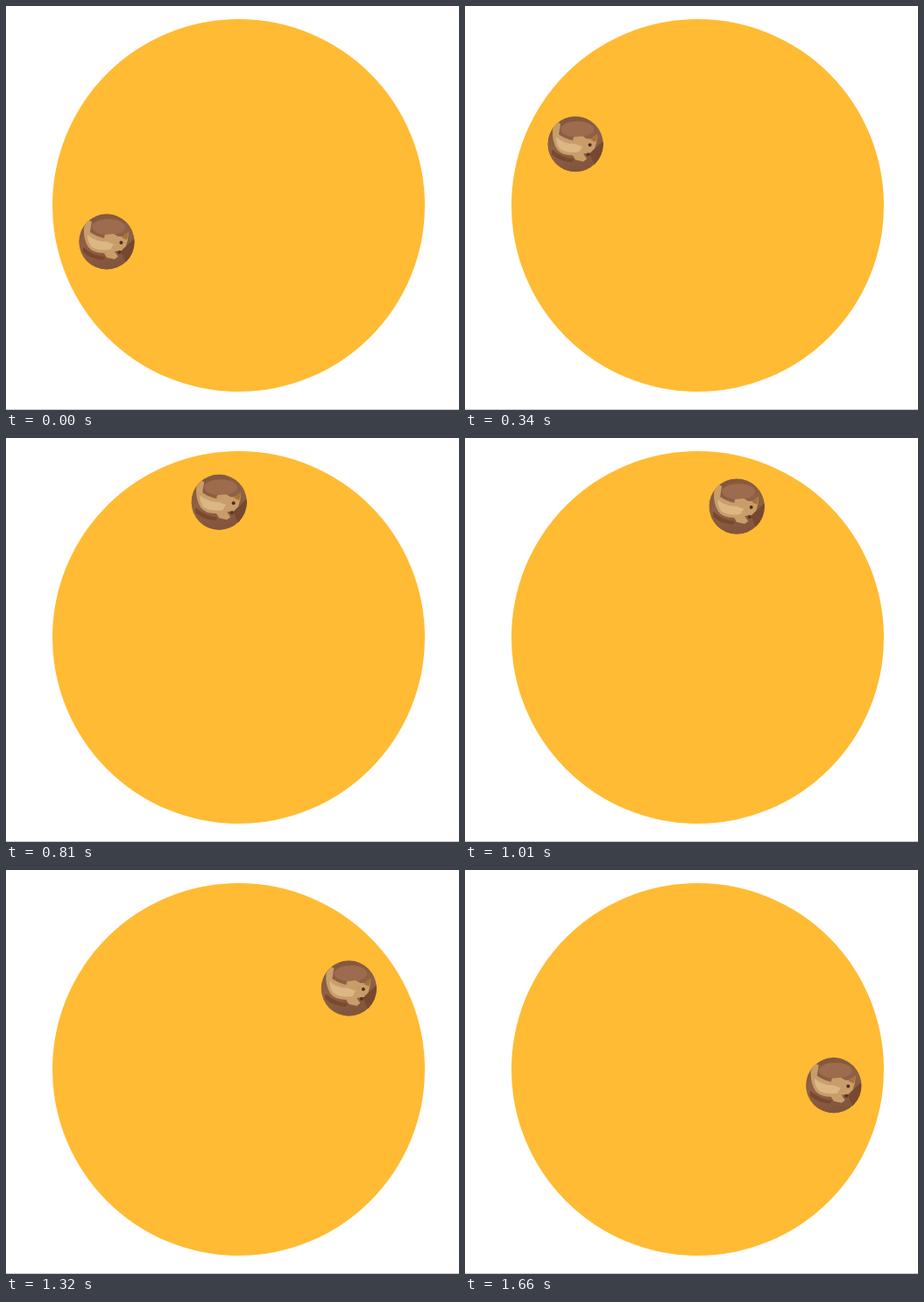
An HTML page that plays this animation: 517x461 px, repeating every 1.74 s.

```html
<!DOCTYPE html>
<html lang="en">
<head>
<meta charset="utf-8">
<title>Orbit</title>
<style>
  @property --turn { syntax: "<angle>"; inherits: false; initial-value: 0deg; }

  html, body { margin: 0; width: 100%; height: 100%; overflow: hidden; background: #fff; }
  svg { display: block; width: 517px; height: 461px; }

  /* the ball circles the centre but stays upright */
  #ball {
    transform: rotate(var(--turn)) translateX(-156.2px) rotate(calc(-1 * var(--turn)));
    animation: orbit 1740ms steps(11, end) infinite;
  }

  /* three legs of eleven ticks, then a short rest */
  @keyframes orbit {
    0% { --turn: -15.3deg; }
    30.46% { --turn: 50.7deg; }
    63.22% { --turn: 119deg; }
    94.83%, 100% { --turn: 186.6deg; }
  }
</style>
</head>
<body>
<svg viewBox="0 0 517 461">
  <defs>
    <clipPath id="round"><circle r="31.7"/></clipPath>
    <linearGradient id="floor" x1="0" y1="0" x2=".3" y2="1">
      <stop offset="0" stop-color="#82553b"/>
      <stop offset=".55" stop-color="#8f6145"/>
      <stop offset="1" stop-color="#83553d"/>
    </linearGradient>
  </defs>
  <circle cx="265.5" cy="227.5" r="212.5" fill="#ffbb33"/>
  <path d="M0 460.5H517" stroke="#c8c8c8"/>
  <g transform="translate(265.6 227.8)">
    <g id="ball" clip-path="url(#round)">
      <circle r="32" fill="url(#floor)"/>
      <ellipse cx="2" cy="-17" rx="19" ry="9" fill="#9d6b4d"/>
      <path d="M16 11L32 -4V14L22 24Z" fill="#76482f"/>
      <path d="M-27 6Q-14 17 -2 17L-4 21Q-18 20 -27 12Z" fill="#78492f"/>
      <path d="M-26 -17L-21 -25L-17 -23L-19 -11Q-12 -6 -3 -4L-2 -8L8 -9L13 -6L18 -6L25 -11L24 -2L22 5L17 10L9 11L13 17L9 20L0 18L-3 13Q-16 13 -21 6Q-27 -3 -26 -17Z" fill="#c99d69"/>
      <path d="M-22 -8Q-13 0 0 0L8 3L4 9Q-9 11 -17 6Q-22 1 -22 -8Z" fill="#dab783"/>
      <path d="M17 -5L25 -11L23 -2Z" fill="#aa7038"/>
      <circle cx="16.5" cy="1" r="2" fill="#4f2e1a"/>
      <circle cx="14.5" cy="12" r="2" fill="#5b361f"/>
    </g>
  </g>
</svg>
</body>
</html>
```
